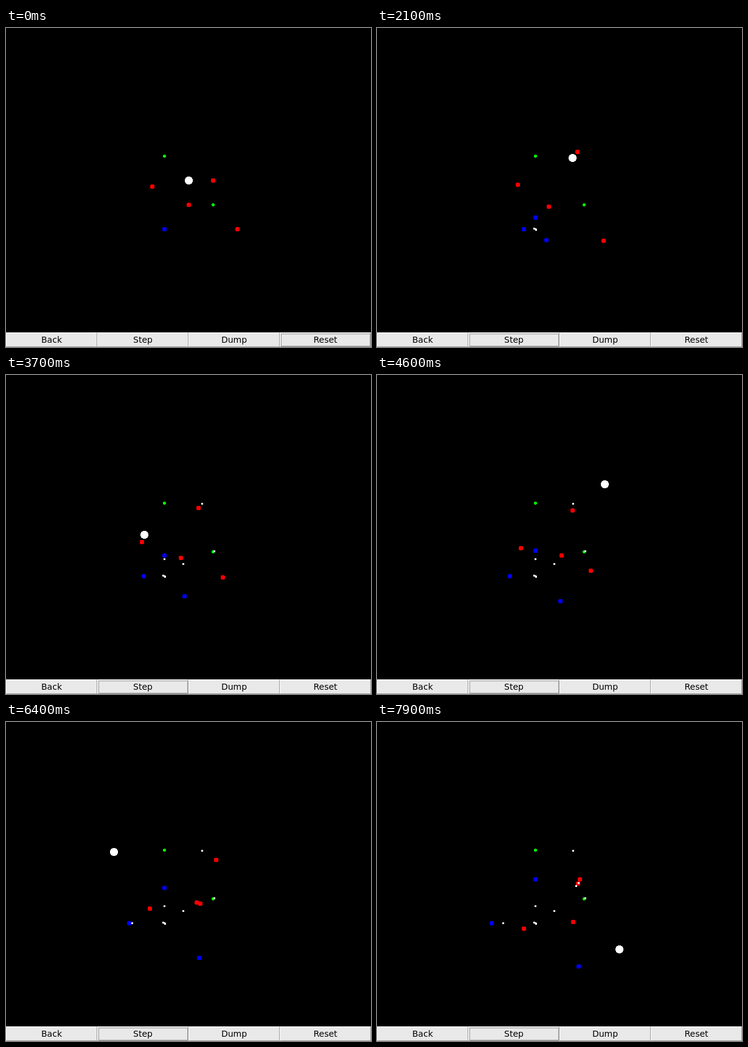
Animation, 600 px wide and 524 px high, one loop 8 s. Source, as an HTML page with a canvas:

```html
<!DOCTYPE html>
<html lang="en">
<head>
<meta charset="utf-8">
<title>Particle stepper</title>
<style>
html, body { margin: 0; width: 100%; height: 100%; overflow: hidden; background: #000; }
canvas { position: absolute; left: 0; top: 0; }
.bar { position: absolute; left: 0; top: 500px; width: 600px; height: 24px; display: flex; }
.btn {
  position: relative; box-sizing: border-box; width: 150px; height: 24px;
  background: #e9e9e9; border: 1px solid; border-color: #fff #9c9c9c #9c9c9c #fff;
  font: 14px/22px "DejaVu Sans", sans-serif; color: #000; text-align: center;
}
.btn.focus::after {
  content: ""; position: absolute; left: 1px; top: 1px; width: 145px; height: 19px;
  border: 1px solid #9c9c9c;
}
</style>
</head>
<body>
<canvas id="stage" width="600" height="500"></canvas>
<div class="bar">
  <div class="btn">Back</div>
  <div class="btn">Step</div>
  <div class="btn">Dump</div>
  <div class="btn">Reset</div>
</div>
<script>
const STEP = 100, STEPS = 80, TURN = 2 * Math.PI;
const HUB = [290, 271], SOURCE = [260, 330];
const ctx = document.getElementById('stage').getContext('2d');
const buttons = document.querySelectorAll('.btn');

const greens = [[260, 210], [340, 290]];
const blueDirs = [[0, -1], [-1, 0], [1, 1]];

// Reds drift between a few waypoints, reached at shared steps.
const redSteps = [0, 8, 21, 37, 54, 64, 79];
const reds = [
  [[340, 250], [353, 233], [329, 203], [316, 218], [325, 225], [345, 226], [333, 258]],
  [[300, 290], [293, 291], [282, 293], [287, 300], [318, 292], [313, 296], [322, 328]],
  [[240, 260], [250, 261], [231, 257], [223, 274], [247, 293], [236, 306], [241, 339]],
  [[380, 330], [392, 320], [372, 349], [356, 332], [346, 311], [319, 298], [330, 265]]
];

// The large body spirals clockwise around the hub through these points.
const orbitSteps = [0, 8, 21, 31, 37, 45, 54, 64, 72, 79];
const orbit = toPolar([
  [300, 250], [293, 264], [321, 213], [262, 301], [227, 262],
  [357, 162], [364, 336], [177, 213], [395, 141], [398, 373]
]);

// Collision marks: [step, x, y].
const hits = [
  [26, 342, 289], [28, 322, 211], [30, 291, 310], [32, 260, 302],
  [59, 207, 330], [78, 327, 269], [79, 331, 264]
];
for (const i of [-1, 0, 1]) {
  hits.push([1, Math.floor(SOURCE[0] + 1.5 * i), SOURCE[1] + i]);
}

// [angle, radius] pairs with the angle always growing.
function toPolar(points) {
  let last = -Infinity;
  return points.map(([x, y]) => {
    const dx = x - HUB[0], dy = y - HUB[1];
    let angle = Math.atan2(dy, dx);
    if (last > angle) angle += TURN * Math.ceil((last - angle) / TURN);
    last = angle;
    return [angle, Math.hypot(dx, dy)];
  });
}

function between(steps, values, n) {
  let i = 0;
  while (i < steps.length - 2 && n >= steps[i + 1]) i++;
  const u = (n - steps[i]) / (steps[i + 1] - steps[i]);
  return values[i].map((v, k) => v + (values[i + 1][k] - v) * u);
}

function orbitAt(n) {
  const [angle, radius] = between(orbitSteps, orbit, n);
  return [HUB[0] + radius * Math.cos(angle), HUB[1] + radius * Math.sin(angle)];
}

// Hard-edged disc centred on a pixel.
function dot([x, y], r, color) {
  ctx.fillStyle = color;
  for (let dy = -r; dy <= r; dy++) {
    const half = Math.min(r, Math.floor(Math.sqrt((r + 0.65) ** 2 - dy * dy)));
    ctx.fillRect(x - half, y + dy, 2 * half + 1, 1);
  }
}

function draw(n) {
  ctx.fillStyle = '#000';
  ctx.fillRect(0, 0, 600, 500);
  greens.forEach(p => dot(p, 2, '#0f0'));
  blueDirs.forEach(dir => dot(dir.map((d, k) => Math.floor(SOURCE[k] + 0.9 * n * d)), 3, '#00f'));
  reds.forEach(path => dot(between(redSteps, path, n).map(Math.round), 3, '#f00'));
  dot(orbitAt(n).map(Math.round), 6, '#fff');
  hits.filter(h => n >= h[0]).forEach(h => dot(h.slice(1), 1, '#fff'));
  buttons.forEach((b, i) => b.classList.toggle('focus', i === (n ? 1 : 3)));
}

const start = performance.now();
function tick() {
  draw(Math.floor((performance.now() - start) / STEP) % STEPS);
  requestAnimationFrame(tick);
}
tick();
</script>
</body>
</html>
```
